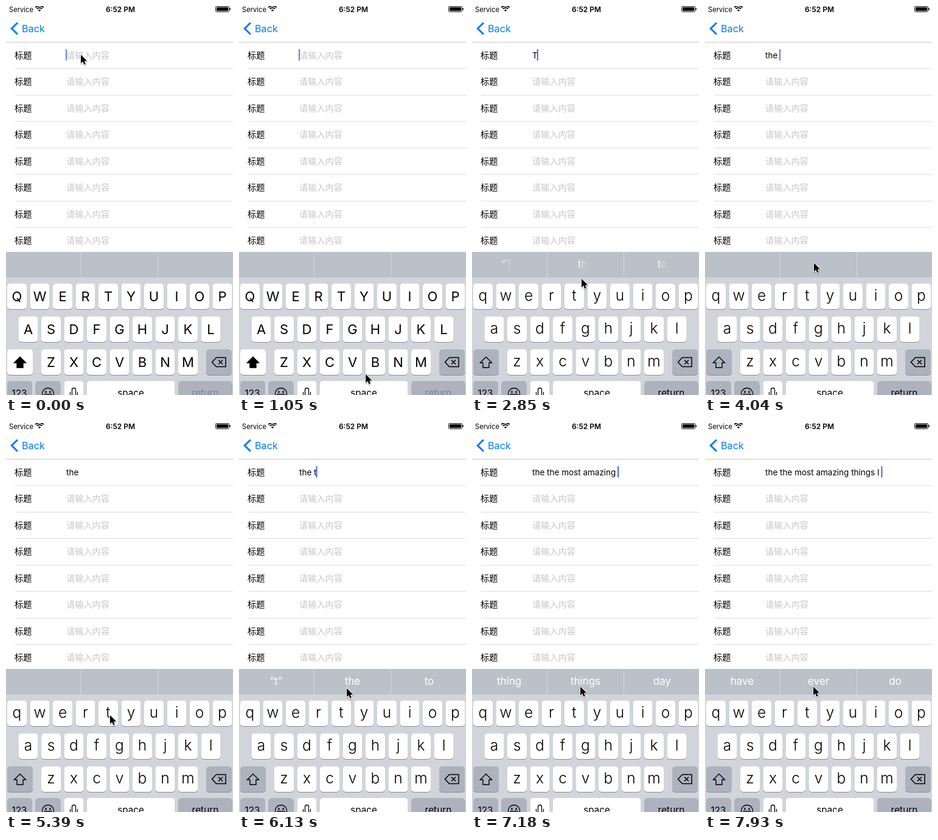
These frames come from a looping animation (373 px wide and 639 px high, 8 s). An HTML page with a canvas:

```html
<!DOCTYPE html>
<html lang="zh-CN">
<head>
<meta charset="utf-8">
<style>
html, body { margin: 0; width: 100%; height: 100%; overflow: hidden; background: #fff; }
canvas { display: block; width: 100vw; height: 100vh; }
</style>
</head>
<body>
<canvas id="stage" width="373" height="639"></canvas>
<script>
const ctx = document.getElementById('stage').getContext('2d');
const LOOP = 8000;
const LATIN = 'Inter, Roboto, sans-serif';
const CJK = '"Noto Sans CJK SC", "Noto Sans CJK", sans-serif';
const BLUE = '#007aff', GRAY_KEY = '#adb3be';

// What the field and the suggestion bar hold from a given time on
const states = [
  { at: -750, text: '', words: [] },
  { at: 2550, text: 'T', words: [] },
  { at: 2700, text: 'T', words: ['“T”', 'the', 'to'], wipe: true },
  { at: 3300, text: 'the ', words: [] },
  { at: 5550, text: 'the t', words: [] },
  { at: 5700, text: 'the t', words: ['“t”', 'the', 'to'], wipe: true },
  { at: 6280, text: 'the the ', words: ['first', 'most', 'same'] },
  { at: 6700, text: 'the the most ', words: ['important', 'amazing', 'beautiful'] },
  { at: 7100, text: 'the the most amazing ', words: ['thing', 'things', 'day'] },
  { at: 7400, text: 'the the most amazing things ', words: ['in', 'I', 'to'] },
  { at: 7750, text: 'the the most amazing things I ', words: ['have', 'ever', 'do'] }
];

// Pointer path: time, x, y
const pointerPath = [
  [0, 123, 80], [100, 123, 80], [700, 211, 630], [1000, 211, 630],
  [1400, 150, 67], [1900, 180, 522], [2050, 180, 522], [2300, 172, 478],
  [2600, 172, 478], [2850, 180, 448], [3000, 180, 435], [3250, 179, 422],
  [5040, 179, 422], [5380, 171, 480], [5650, 171, 480], [6100, 177, 436],
  [6280, 178, 433], [8000, 178, 433]
];
const taps = [2400, 5400], TAP_LENGTH = 150;

const clamp = v => Math.max(0, Math.min(1, v));
const ease = u => u * u * (3 - 2 * u);

function text(str, x, y, size, { color = '#000', align = 'left', weight = 400, family = LATIN } = {}) {
  ctx.font = `${weight} ${size}px ${family}`;
  ctx.textAlign = align;
  ctx.fillStyle = color;
  ctx.fillText(str, x, y);
}

function rect(x, y, w, h, color) {
  ctx.fillStyle = color;
  ctx.fillRect(x, y, w, h);
}

function round(x, y, w, h, r, color) {
  ctx.beginPath();
  ctx.roundRect(x, y, w, h, r);
  ctx.fillStyle = color;
  ctx.fill();
}

function trace(points, close) {
  ctx.beginPath();
  points.forEach(([x, y]) => ctx.lineTo(x, y));
  if (close) ctx.closePath();
}

function stroke(color, width) {
  ctx.strokeStyle = color;
  ctx.lineWidth = width;
  ctx.stroke();
}

function drawStatusBar() {
  text('Service', 5, 9.5, 11.2);
  text('6:52 PM', 188, 9.7, 12, { align: 'center', weight: 600 });
  for (const r of [3, 6.2, 9.4]) {
    ctx.beginPath();
    ctx.arc(55, 9, r, -Math.PI * .75, -Math.PI * .25);
    if (r === 3) {
      ctx.lineTo(55, 9);
      ctx.fillStyle = '#000';
      ctx.fill();
    } else stroke('#000', 1.7);
  }
  ctx.beginPath();
  ctx.roundRect(344.5, .5, 22, 9, 2);
  stroke('#000', 1);
  round(346, 2, 19, 6, 1, '#000');
  rect(367.5, 3.5, 1.5, 3, '#000');
}

function drawNavBar() {
  trace([[19, 27.5], [9.3, 37], [19, 46.5]]);
  stroke(BLUE, 3);
  text('Back', 26, 43, 16.2, { color: BLUE });
  rect(0, 59, 373, 1, '#c9c9cc');
}

function drawRows(state, time) {
  for (let i = 0; i < 8; i++) {
    const y = 80.5 + 43.5 * i;
    text('标题', 14, y + 5.2, 14.2, { family: CJK });
    if (i || !state.text) text('请输入内容', 99, y + 5.2, 14.2, { color: '#c7c7cd', family: CJK });
    rect(15, Math.round(y + 21.5), 358, 1, '#dddde0');
  }
  text(state.text, 99, 85.5, 13.5);
  const caretX = 98 + ctx.measureText(state.text).width;
  ctx.globalAlpha = caretAlpha(time, state.text);
  rect(caretX, 71, 2, 18.5, '#4465e4');
  ctx.globalAlpha = 1;
}

// Solid after input, then a blink of 1050 ms: fade, gap, solid
function caretAlpha(time, value) {
  const age = time - states.find(s => s.text === value).at - 700;
  if (age < 0) return 1;
  const phase = age % 1050;
  return phase < 600 ? 1 - clamp(phase / 300) : 1;
}

function drawSuggestions(state, time) {
  rect(0, 404, 373, 42, '#bac1c9');
  rect(123, 404, 1, 42, '#d3d8dd');
  rect(249, 404, 1, 42, '#d3d8dd');
  state.words.forEach((word, i) => {
    const centre = [61, 186.5, 312.5][i] - (word.length > 8 ? 3.3 : 0);
    ctx.font = `400 17px ${LATIN}`;
    let color = '#fff';
    if (state.wipe) {
      const edge = centre - ctx.measureText(word).width / 2 + (time - state.at) * .12;
      color = ctx.createLinearGradient(edge - 19, 0, edge, 0);
      color.addColorStop(0, '#fff');
      color.addColorStop(1, '#fff0');
    }
    text(word, centre, 429.5, 17, { color, align: 'center' });
  });
}

function key(x, y, w, color = '#fff') {
  round(x, y + 1, w, 42, 5, '#888b90');
  round(x, y, w, 42, 5, color);
}

function drawLetters(upper) {
  const rows = [['qwertyuiop', 2, 456], ['asdfghjkl', 20.5, 510], ['zxcvbnm', 58, 564]];
  for (const [letters, left, y] of rows) {
    [...letters].forEach((letter, i) => {
      const x = left + 37.5 * i;
      key(x, y, 32);
      if (upper) text(letter.toUpperCase(), x + 16, y + 29, 22, { align: 'center' });
      else text(letter, x + 16, y + 27.5, 24.5, { align: 'center', weight: 300 });
    });
  }
}

function drawShift(upper) {
  key(2, 564, 42, upper ? '#fff' : GRAY_KEY);
  trace([[23, 576.5], [32.5, 586], [28, 586], [28, 594], [18, 594], [18, 586], [13.5, 586]], true);
  ctx.fillStyle = '#000';
  if (upper) ctx.fill();
  stroke('#000', 1.4);
}

function drawDelete() {
  key(329, 564, 42, GRAY_KEY);
  trace([[338.5, 585], [345.5, 577.5], [361, 577.5], [361, 592.5], [345.5, 592.5]], true);
  stroke('#000', 1.5);
  trace([[349, 581.5], [356, 588.5]]);
  stroke('#000', 1.6);
  trace([[356, 581.5], [349, 588.5]]);
  stroke('#000', 1.6);
}

function drawBottomRow(hasText) {
  const y = 616, label = { align: 'center' };
  key(2, y, 41, GRAY_KEY);
  key(48.5, y, 41, GRAY_KEY);
  key(95.5, y, 32);
  key(133, y, 144.5);
  key(283.5, y, 88, GRAY_KEY);
  text('123', 22, 642, 15.3, label);
  text('space', 205, 641, 15.2, label);
  text('return', 327.5, 641, 15.4, { align: 'center', color: hasText ? '#000' : '#7f848e' });

  ctx.beginPath();
  ctx.arc(69, 637, 9.5, 0, 7);
  stroke('#000', 1.3);
  for (const x of [65.5, 72.5]) round(x - 1, 632, 2, 4, 1, '#000');
  ctx.beginPath();
  ctx.arc(69, 637, 6, .15, Math.PI - .15);
  ctx.closePath();
  stroke('#000', 1.2);

  ctx.beginPath();
  ctx.roundRect(108.5, 627.5, 6, 13, 3);
  stroke('#000', 1.3);
  ctx.beginPath();
  ctx.moveTo(105.5, 634);
  ctx.lineTo(105.5, 637);
  ctx.arc(111.5, 637, 6, Math.PI, 0, true);
  ctx.lineTo(117.5, 634);
  stroke('#000', 1.2);
}

function drawKeyPopup(letter) {
  ctx.save();
  ctx.beginPath();
  ctx.moveTo(146, 398);
  ctx.lineTo(190, 398);
  ctx.quadraticCurveTo(198, 398, 198, 406);
  ctx.lineTo(198, 440);
  ctx.bezierCurveTo(198, 452, 184, 450, 184, 464);
  ctx.lineTo(184, 493);
  ctx.quadraticCurveTo(184, 498, 179, 498);
  ctx.lineTo(157, 498);
  ctx.quadraticCurveTo(152, 498, 152, 493);
  ctx.lineTo(152, 464);
  ctx.bezierCurveTo(152, 450, 138, 452, 138, 440);
  ctx.lineTo(138, 406);
  ctx.quadraticCurveTo(138, 398, 146, 398);
  ctx.shadowColor = '#0006';
  ctx.shadowBlur = 3;
  ctx.fillStyle = '#fff';
  ctx.fill();
  ctx.restore();
  text(letter, 168, 439, 36, { align: 'center', weight: 300 });
}

function drawPointer(time) {
  const i = pointerPath.findIndex(p => p[0] > time);
  const [t0, x0, y0] = pointerPath[i - 1], [t1, x1, y1] = pointerPath[i];
  const u = ease((time - t0) / (t1 - t0));
  ctx.save();
  ctx.translate(x0 + (x1 - x0) * u, y0 + (y1 - y0) * u);
  trace([[0, 0], [0, 14.3], [3.2, 11.3], [5.4, 16.3], [7.9, 15.2], [5.8, 10.5], [10.2, 10.3]], true);
  ctx.lineJoin = 'round';
  ctx.shadowColor = '#0005';
  ctx.shadowBlur = 2;
  ctx.shadowOffsetY = 1;
  stroke('#fff', 2);
  ctx.shadowColor = 'transparent';
  ctx.fillStyle = '#000';
  ctx.fill();
  ctx.restore();
}

function draw(time) {
  const state = states.findLast(s => s.at <= time);
  const upper = !state.text;
  rect(0, 0, 373, 639, '#fff');
  drawStatusBar();
  drawNavBar();
  drawRows(state, time);
  rect(0, 446, 373, 193, '#d1d5db');
  drawSuggestions(state, time);
  drawLetters(upper);
  drawShift(upper);
  drawDelete();
  drawBottomRow(!upper);
  if (taps.some(at => time >= at && time < at + TAP_LENGTH)) drawKeyPopup(upper ? 'T' : 't');
  drawPointer(time);
}

function frame() {
  draw(performance.now() % LOOP);
  requestAnimationFrame(frame);
}
frame();
</script>
</body>
</html>
```
